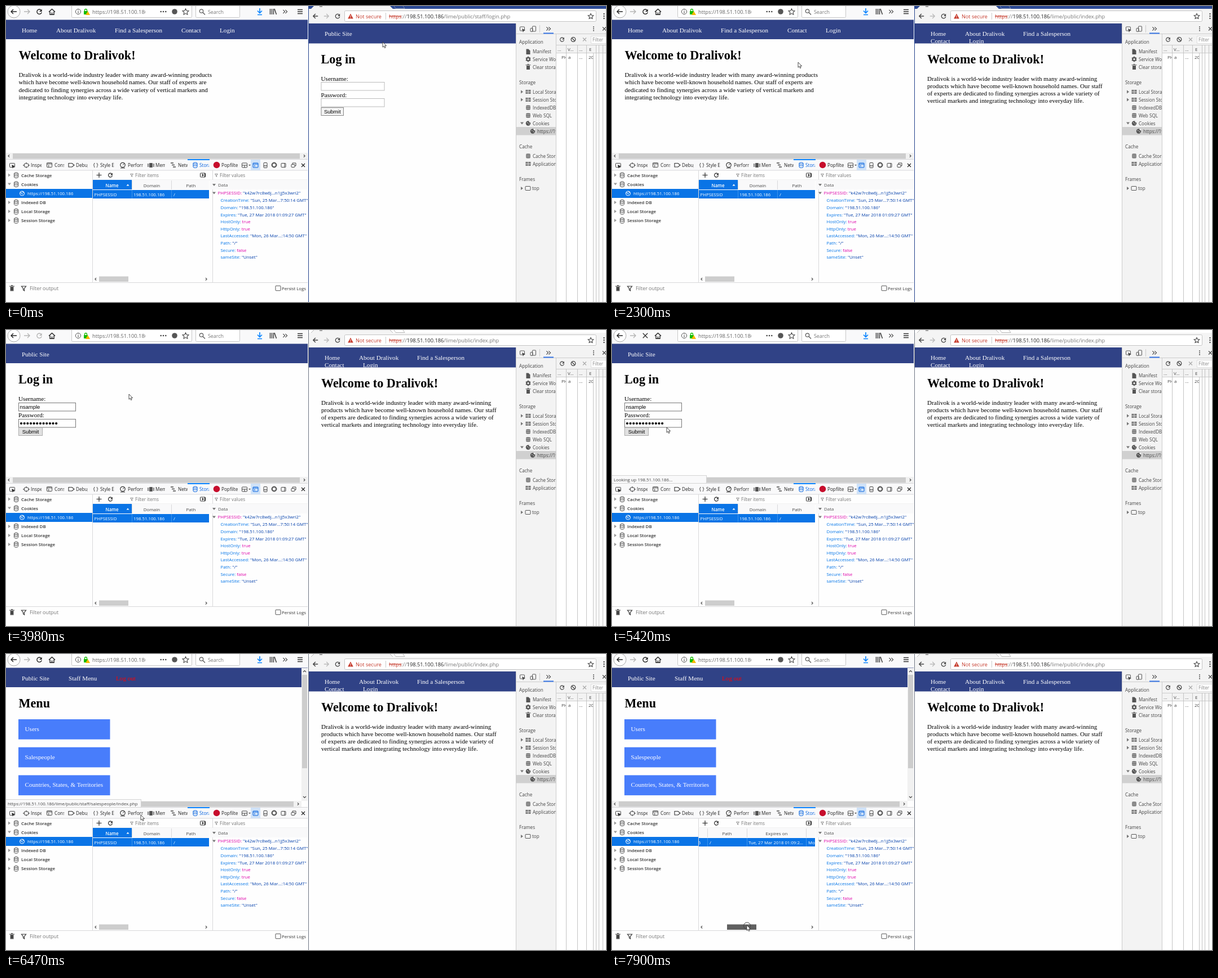
An HTML page that plays this animation: 1064x526 px, repeating every 8000 ms.

```html
<!DOCTYPE html>
<html lang="en">
<head>
<meta charset="utf-8">
<title>Two browsers, one session</title>
<style>
html, body { margin: 0; width: 100%; height: 100%; overflow: hidden; background: #fefefe; }
#stage { display: block; width: 100vw; height: 100vh; }
text { font: 7.85px "Open Sans", "Noto Sans", sans-serif; white-space: pre; }
.page text { font: 11.15px "Liberation Serif", serif; }
.page text.title { font-size: 22.2px; font-weight: bold; }
.page text.field { font: 9.5px "Liberation Sans", sans-serif; }
text.bold { font-weight: 600; }
</style>
</head>
<body>
<svg id="stage" viewBox="0 0 1064 526" xmlns="http://www.w3.org/2000/svg"></svg>
<script>
const HOST = '198.51.100.186', SITE = 'https://' + HOST, ROOT = '/lime/public/';
const BRAND = 'Dralivok';
const NAVY = '#304286', SELECT = '#0a74e6', INK = '#222', PALE = '#f9f9fa', RULE = '#d8d8da';

// Drawing helpers
const rect = (x, y, w, h, fill, stroke = 'none', extra = '') =>
  `<rect x="${x}" y="${y}" width="${w}" height="${h}" fill="${fill}" stroke="${stroke}" ${extra}/>`;
const line = (d, color = INK, width = 1, fill = 'none') =>
  `<path d="${d}" fill="${fill}" stroke="${color}" stroke-width="${width}"/>`;
const shape = (d, fill = INK) => `<path d="${d}" fill="${fill}"/>`;
const circle = (x, y, r, fill = 'none', stroke = 'none', width = 1) =>
  `<circle cx="${x}" cy="${y}" r="${r}" fill="${fill}" stroke="${stroke}" stroke-width="${width}"/>`;
const text = (x, y, s, fill = INK, size = 0, cls = '', anchor = 'start') =>
  `<text x="${x}" y="${y}" fill="${fill}" class="${cls}" text-anchor="${anchor}"${size ? ` style="font-size:${size}px"` : ''}>${s}</text>`;
const span = (s, fill, extra = '') => `<tspan fill="${fill}" ${extra}>${s}</tspan>`;
const clip = (x, y, w, h, body) =>
  `<svg x="${x}" y="${y}" width="${w}" height="${h}" viewBox="${x} ${y} ${w} ${h}" overflow="hidden">${body}</svg>`;
const group = (id, body, cls = '') => `<g id="${id}" class="${cls}">${body}</g>`;

// Icons
const arrow = (x, y, dir, color, r = 5) =>
  line(`M${x - dir * r} ${y}H${x + dir * r}M${x + dir * (r - 4)} ${y - 4}L${x + dir * r} ${y}L${x + dir * (r - 4)} ${y + 4}`, color, 1.4);
const reload = (x, y, r, color = INK) =>
  line(`M${x + r * .7} ${y - r * .7}A${r} ${r} 0 1 0 ${x + r} ${y + r * .25}`, color, r * .33) +
  shape(`M${x + r * 1.1} ${y - r * 1.1}V${y}H${x}Z`, color);
const cross = (x, y, r, color = INK, w = 1.2) =>
  line(`M${x - r} ${y - r}l${2 * r} ${2 * r}m0 ${-2 * r}l${-2 * r} ${2 * r}`, color, w);
const star = (x, y, r) => {
  const pts = Array.from({ length: 10 }, (_, i) => {
    const a = i * Math.PI / 5, d = i % 2 ? r * .48 : r;
    return (x + d * Math.sin(a)).toFixed(1) + ' ' + (y - d * Math.cos(a)).toFixed(1);
  });
  return line(`M${pts.join('L')}Z`, '#444', 1.1);
};
const dots = (x, y, dx, dy, r, color = '#444') => [-1, 0, 1].map(i => circle(x + i * dx, y + i * dy, r, color)).join('');
const chevron = (x, y, dir, r = 2.2, color = '#444') =>
  line(`M${x - dir * r / 2} ${y - r}L${x + dir * r / 2} ${y}L${x - dir * r / 2} ${y + r}`, color, 1.1);
const more = (x, y) => chevron(x - 2, y, 1, 3.2) + chevron(x + 2, y, 1, 3.2);
const twisty = (x, y, open, color = '#777') =>
  shape(open ? `M${x - 3} ${y - 2}h6l-3 4Z` : `M${x - 2} ${y - 3}v6l4-3Z`, color);
const stack = (x, y, color = '#444') => line(`M${x - 3.5} ${y - 3}v6.5a3.5 1.5 0 0 0 7 0v-6.5a3.5 1.5 0 0 0-7 0a3.5 1.5 0 0 0 7 0M${x - 3.5} ${y}a3.5 1.5 0 0 0 7 0`, color, 1);
const drum = (x, y) => rect(x - 4, y - 4, 8, 8, '#666', 'none', 'rx="2"') + line(`M${x - 4} ${y - 1.5}h8m-8 3h8`, '#f3f3f3', .8);
const grid = (x, y) => rect(x - 4.5, y - 3.5, 9, 7, '#666') + line(`M${x - 4.5} ${y - 1}h9m-9 2.3h9M${x} ${y - 3.5}v7`, '#f3f3f3', .8);
const funnel = (x, y, r, color) => line(`M${x - r} ${y - r}h${2 * r}l${-r * .75} ${r}v${r}l${-r * .5} ${-r * .4}v${-r * .6}Z`, color, r > 3 ? 1.2 : .8);
const cookie = (x, y) => circle(x, y, 4.2, '#555') + circle(x - 1.3, y - 1, .8, '#eee') + circle(x + 1.5, y + 1, .8, '#eee') + circle(x + 3, y - 3, 1.6, '#eee');
const frame = (x, y, w, h, color = '#444') => rect(x - w / 2, y - h / 2, w, h, 'none', color, 'rx=".8"');

// Web pages shown in both windows
const nav = (x, y, names) => names.map(([dx, s, color]) => text(x + dx, y, s, color || '#fff')).join('');
const title = (x, y, s) => text(x, y, s, '#000', 0, 'title');
const para = (x, y, lead, rows) => rows.map((s, i) => text(x, y + i * lead, s, '#000')).join('');
const input = (x, y, w, border) => rect(x + .5, y, w, 14.5, '#fff', border);
const filledFields = (x, y) => text(x + 2.5, y + 45, 'nsample', '#000', 0, 'field') +
  Array.from({ length: 12 }, (_, i) => circle(x + 5 + i * 5.65, y + 71, 2.1, '#000')).join('');
const loginForm = (x, y, w, fieldY, border, button) =>
  title(x, y, 'Log in') + text(x, y + 31, 'Username:', '#000') + text(x, y + 59.5, 'Password:', '#000') +
  input(x, fieldY, w, border) + input(x, fieldY + 29, w, border) +
  rect(x + .5, y + 78.5, button.w, 14, button.fill, button.border) +
  text(x + .5 + button.w / 2, y + 89, 'Submit', '#000', 0, 'field', 'middle');

const leftHome = nav(0, 47, [[28, 'Home'], [89, 'About ' + BRAND], [193, 'Find a Salesperson'], [311, 'Contact'], [379, 'Login']]) +
  title(22.5, 95, `Welcome to ${BRAND}!`) +
  para(22.5, 126, 13.4, [BRAND + ' is a world-wide industry leader with many award-winning products',
    'which have become well-known household names. Our staff of experts are',
    'dedicated to finding synergies across a wide variety of vertical markets and',
    'integrating technology into everyday life.']);
const leftLogin = nav(0, 47, [[28, 'Public Site']]) +
  loginForm(22, 95, 101, 129.5, '#777', { w: 42, fill: '#e1e1e1', border: '#adadad' }) + filledFields(22, 95);
const leftMenu = nav(0, 47, [[28, 'Public Site'], [111, 'Staff Menu'], [195, 'Log out', '#f00']]) + title(22.5, 95, 'Menu') +
  ['Users', 'Salespeople', 'Countries, States, &amp; Territories'].map((s, i) =>
    rect(22, 116 + i * 49.7, 162.5, 35.7, '#487dfb') + text(33.5, 137 + i * 49.7, s, '#fff')).join('') +
  rect(524, 25, 11, 236, '#f1f1f1') + rect(525, 37, 9, 166, '#cdcdcd') +
  line('M527 32l2.5-2.5l2.5 2.5M527 253l2.5 2.5l2.5-2.5', '#444', 1.1);
const rightLogin = nav(0, 53, [[565, 'Public Site']]) +
  loginForm(558.5, 102, 112, 135.5, '#bbb', { w: 39.5, fill: '#f4f4f4', border: '#888' });
const rightHome = clip(537, 31, 367, 35, nav(0, 53, [[565, 'Home'], [626, 'About ' + BRAND], [729, 'Find a Salesperson']]) +
    nav(0, 66, [[565, 'Contact'], [633, 'Login']])) +
  title(559, 102, `Welcome to ${BRAND}!`) +
  para(559, 132.7, 13, [BRAND + ' is a world-wide industry leader with many award-winning',
    'products which have become well-known household names. Our staff',
    'of experts are dedicated to finding synergies across a wide variety of',
    'vertical markets and integrating technology into everyday life.']);

// Left window
const leftBar = rect(0, 0, 535, 25, PALE) +
  circle(14, 10, 11, '#fff', '#aaa') + arrow(14, 10, -1, '#222') + arrow(37, 10, 1, '#b5b5b5') +
  group('reload', reload(59, 10, 4.2)) + group('reloadOff', reload(59, 10, 4.2, '#b5b5b5')) + group('stop', cross(59, 10, 4.2, '#333', 1.4)) +
  line('M76 10.5l5.5-5l5.5 5M78 10v5.2h7V10M81.5 15v-3.5', INK, 1.4) +
  rect(116.5, -2, 213, 22.5, '#fff', '#c8c8c8', 'rx="2"') +
  circle(128, 10, 4.6, 'none', '#555') + line('M128 9.2v3.6M128 7v1.1', '#555', 1.2) +
  rect(138, 9, 7, 6, '#12bc00') + line('M139.5 9V7.5a2 2 0 0 1 4 0V9', '#12bc00', 1.3) + shape('M145 9l4 7h-8Z', '#f5b800') +
  clip(153, 0, 94, 22, text(153, 13.5, SITE, '#666', 9.35)) +
  dots(279, 10, 4.3, 0, 1.3) + circle(299, 10, 4.8, '#555') + star(318.5, 10.5, 5.8) +
  rect(336.5, -2, 78, 22.5, '#fff', '#c8c8c8', 'rx="2"') + circle(346.5, 9, 3.2, 'none', '#555', 1.2) + line('M349 11.5l4 4', '#555', 1.3) +
  text(358, 13.5, 'Search', '#777', 8.9) +
  line('M450 4v8M446 8.5l4 4l4-4M446 15.5h8', '#0a84ff', 1.7) +
  line('M468.5 5v10M471.5 5v10M474.5 5v10M476 5l3.5 10', '#333', 1.4) + more(495, 10) +
  line('M517 6.5h9M517 10h9M517 13.5h9', '#333', 1.4);

const hBar = (id, end) => group(id, rect(0, 261, end + 14, 11, '#f1f1f1') + rect(12, 262, end - 12, 9.5, '#cdcdcd') +
  chevron(5, 266.5, -1) + chevron(end + 8, 266.5, 1));
const status = (id, w, s) => group(id, rect(-.5, 258.5, w, 14, PALE, '#d4d4d4') + text(3, 269, s, '#444', 7.85));

const tabs = [[44, 19, 'Inspector'], [86, 17, 'Console'], [124, 21, 'Debugger'], [167, 25, 'Style Editor'], [216, 27, 'Performance'],
  [265, 17, 'Memory'], [305, 17, 'Network'], [343, 17, 'Storage'], [382, 29, 'Popfilter']];
const toolTabs = rect(0, 272, 535, 20, PALE) + line('M0 272.5H535M0 292H535', RULE) + rect(322, 272, 39, 2, '#0a84ff') +
  tabs.map(([x, w, s]) => clip(x, 275, w, 16, text(x, 286, s, s === 'Storage' ? '#0060df' : INK, 8.2))).join('') +
  frame(11, 283, 9, 7) + shape('M10 282l6 3l-3 1l-1 3Z') +
  frame(36, 283, 7, 6) + line('M30 283h2M40 283h2M36 278v2M36 286v2') +
  frame(77, 282.5, 9, 8) + line('M72.5 280.5h9M74.5 282.5l2 1.5l-2 1.5', '#333') +
  line('M111 279.5h6l4 3.2l-4 3.3h-6Z', '#333', 1.1) + text(154.5, 286, '{ }', INK, 9) +
  circle(207, 282.5, 4.2, 'none', '#333', 1.2) + line('M207 283l2.5-3M203 288h8', '#333') +
  rect(254, 279, 6, 8, '#555', 'none', 'rx="1"') + line('M252 280v6M262 280v6', '#333', 1.2) +
  line('M292 279h5M294 282.5h5M296 286h5', '#444', 1.4) + stack(335.5, 282.5, '#0060df') +
  circle(373.5, 282.5, 5.8, '#c70d2c') +
  frame(423, 283, 9, 8) + line('M418.5 283h9M423 283v4', '#444') + shape('M430 282h4l-2 2Z', '#444') +
  rect(434, 273, 17, 19, '#cfe2f8') + frame(442.5, 283, 9, 8, '#0060df') + line('M438 281h9M440 283l1.5 1l-1.5 1.5', '#0060df') +
  frame(460, 283, 6, 9) + line('M457 284h6') + circle(475.5, 282.5, 3.5, 'none', '#444', 1.6) + circle(475.5, 282.5, 4.6, 'none', '#444', .8) +
  frame(492, 283, 8, 7) + line('M494 279.5v7', '#444') + frame(509, 284, 6, 5) + line('M508 281v-2h6v5h-2', '#444') + cross(527, 283, 3);

const tree = [['Cache Storage', 300.5], ['Cookies', 316.5, 1], ['Indexed DB', 349], ['Local Storage', 365], ['Session Storage', 381]]
  .map(([s, y, open]) => twisty(6, y, open, '#999') + stack(18, y) + text(27, y + 3, s, '#333', 7.95, 'bold')).join('') +
  rect(0, 325, 153, 16, SELECT) + circle(28.5, 333, 4, '#0a74e6', '#fff') + line('M25 332h3l1 3M29 329l1 2l2 1', '#fff') + text(38, 336, SITE, '#fff', 7.75);

const cells = rect(153, 309, 470, 17, PALE) + rect(153, 309, 70, 17, SELECT) + rect(153, 327, 470, 15, SELECT) +
  line('M223.5 310v16M293.5 310v16M363.5 310v16M468.5 310v16', RULE) + line('M223.5 327v15M293.5 327v15M363.5 327v15M468.5 327v15', '#3b92ec') +
  [[188, 'Name', '#fff', 'bold'], [258.5, 'Domain'], [328, 'Path'], [416, 'Expires on'], [520, 'Last accessed on']]
    .map(([x, s, c, k]) => text(x, 322, s, c || '#444', 8, k, 'middle')).join('') + shape('M213.5 319.5h5l-2.5-3Z', '#fff') +
  [[156.5, 'PHPSESSID'], [226, HOST], [297, '/'], [366, 'Tue, 27 Mar 2018 01:09:2…'], [472, 'Mon, 26 Mar 2018']]
    .map(([x, s]) => text(x, 337.8, s, '#fff', 7.8)).join('');

const table = line('M153.5 292V491M366.5 292V491', RULE) + line('M153 309H535', '#e4e4e6') +
  line('M165 296v9M160.5 300.5h9', INK, 1.2) + reload(185, 300.5, 3.5) + funnel(223, 301, 2.5, '#777') + text(229, 304, 'Filter items', '#777', 8.1) +
  frame(349, 300.5, 9, 7, '#333') + shape('M348 298v5l3-2.5Z') + line('M352.5 297v7') +
  clip(154, 309, 206, 34, group('cells', cells)) +
  chevron(159, 485.3, -1) + chevron(355, 485.3, 1) + '<rect id="thumb" y="480.5" width="52" height="9.5"/>';

const BLUE = '#0074e8', STRING = '#003eaa', PINK = '#dd00a9';
const details = funnel(373, 301, 2.5, '#777') + text(379, 304, 'Filter values', '#777', 8.1) +
  rect(361, 309, 174, 17, PALE) + twisty(369, 318, 1) + text(376, 321, 'Data', '#555', 8) + twisty(369, 332.5, 1) +
  clip(361, 326, 174, 130, text(375.5, 335.3, span('PHPSESSID: ', PINK) + span('"k42w7rc8w6j…n1jj5x3wri2"', STRING), INK, 7.85) +
    [['CreationTime', '"Sun, 25 Mar…7:50:14 GMT"'], ['Domain', `"${HOST}"`], ['Expires', '"Tue, 27 Mar 2018 01:09:27 GMT"'], ['HostOnly', 'true'],
      ['HttpOnly', 'true'], ['LastAccessed', '"Mon, 26 Mar…:14:50 GMT"'], ['Path', '"/"'], ['Secure', 'false'], ['sameSite', '"Unset"']]
      .map(([k, v], i) => text(380.5, 348.3 + i * 12.6, span(k + ': ', BLUE) + span(v, v[0] === '"' ? STRING : PINK), INK, 7.85)).join(''));

const consoleBar = line('M0 491.5H535', RULE) + rect(7.5, 499, 6, 7.5, '#555') + line('M6 498h9M9 496.5h3M9.5 500v5M11.5 500v5', '#333') +
  funnel(31.5, 502, 4, '#333') + text(42, 505, 'Filter output', '#777', 8.9) + frame(482.5, 501.5, 9, 8.5, '#555') + text(489, 504.8, 'Persist Logs', '#333', 7.75);

// Right window
const tabStrip = (id, back, edge, tab) => group(id, rect(536, 0, 528, 5, back) + shape('M541 5l5-5h135l5 5Z', '#f4f4f4') +
  line('M541 5l5-5M681 0l5 5M688 0l3 4.5h16l-3-4.5', tab, .8) + rect(536, 0, 1, 526, edge) + line('M556 1h5', '#555'));
const address = (id, path) => group(id, text(679, 21.5, span('https', '#c5392a', 'text-decoration="line-through"') +
  span('://', '#777') + span(HOST, '#222') + span(ROOT + path, '#777'), INK, 9.28));
const rightBar = rect(537, 5, 527, 26, '#f4f4f4') + arrow(549, 18, -1, '#444', 4.2) + arrow(568, 18, 1, '#bbb', 4.2) + reload(588, 18, 3.8, '#444') +
  rect(600.5, 8.5, 446, 19, '#fff', '#c4c4c4', 'rx="2"') + shape('M611 13.5l4.8 9h-9.6Z', '#c5392a') + line('M611 16.5v3M611 20.3v1.2', '#fff') +
  text(620, 21.5, 'Not secure', '#c5392a', 9.1) + line('M673.5 12v12', '#ccc') + star(1037, 18.5, 5) + dots(1060.5, 18, 0, 4, 1.2);

const heading = (y, s) => text(910, y + 3, s, '#444', 8.2);
const item = (x, y, s, icon = '') => icon + text(x, y + 3, s, '#444', 8.1);
const sidebar = clip(905, 49, 70, 477,
  heading(64, 'Application') + heading(135.5, 'Storage') + heading(249.5, 'Cache') + heading(307.5, 'Frames') + rect(905, 215, 70, 14.5, '#d0d0d0') +
  item(934, 81, 'Manifest', shape('M922.5 76.5h4l3 3v6.5h-7Z', '#555')) +
  item(934, 94.5, 'Service Workers', circle(926, 94.5, 3, 'none', '#555', 1.8) + line('M926 89.5v10M921.7 92l8.6 5M921.7 97l8.6-5', '#555', 1.2) + circle(926, 94.5, 1.5, '#f3f3f3')) +
  item(934, 108.5, 'Clear storage', rect(923, 106, 6, 7, '#555') + line('M921.5 104.8h9M924.5 103.5h3', '#555')) +
  [['Local Storage', 152.5], ['Session Storage', 166.5]].map(([s, y]) => twisty(915, y) + item(934, y, s, grid(926, y))).join('') +
  [['IndexedDB', 180.5], ['Web SQL', 194.5], ['Cache Storage', 266.5]].map(([s, y]) => item(934, y, s, drum(926, y))).join('') +
  item(934, 280.5, 'Application Cache', grid(926, 280.5)) + twisty(915, 208.5, 1) + item(934, 208.5, 'Cookies', cookie(926, 208.5)) +
  item(942, 222.5, SITE, cookie(934, 222.5)) + twisty(915, 324) + item(933, 324, 'top', frame(925.5, 324, 9, 7, '#555')));

const devTools = rect(904, 31, 160, 495, '#f3f3f3') + rect(975, 83, 89, 443, '#fff') + sidebar +
  line('M904.5 31V526M975.5 49V526M904 49.5H1064M975 69.5H1064M975 83.5H1064', '#ccc') +
  frame(915.5, 40.5, 8, 7, '#555') + shape('M915 40l6 3l-3 1l-1 3Z', '#444') + frame(936.5, 40.5, 6, 9, '#555') + frame(932, 42.5, 4, 6, '#555') +
  line('M946.5 34v13', '#ccc') + more(962, 40.5) + rect(953, 47.5, 18, 2, '#3b78e7') + dots(1042, 40.5, 0, 3.3, 1) + cross(1061, 40.5, 3, '#444') +
  reload(986, 59.5, 3.5, '#444') + circle(1006, 59.5, 3.8, 'none', '#444', 1.3) + line('M1003.5 57l5 5', '#444', 1.3) + cross(1026, 59.5, 3, '#aaa') +
  rect(1037.5, 53.5, 40, 13, '#fff', '#ddd') + text(1040, 62.7, 'Filter', '#888', 8.1) +
  line('M993.5 69V526M1013.5 69V526M1029.5 69V526M1041.5 83V526M1046.5 69V526M1051.5 69V526M1058.5 69V526', '#c4c4c4') +
  [[978, 79.5, '...'], [996, 79.5, 'V...'], [1016, 79.5, '...'], [1034, 79.5, 'E'], [985, 94, 'PH'], [997, 94, 'a'], [1016, 94, '...'], [1033, 94, '20']]
    .map(([x, y, s]) => clip(x, y - 10, y < 90 ? 13 : 8, 13, text(x, y, s, '#444', 8))).join('');

const pointer = group('cursor',
  group('ring', circle(.5, 1, 6, 'none', '#444', 1)) +
  group('arrow', line('M0 0V9.2L2.1 7.3L3.6 10.6L5.1 9.9L3.7 6.7H6.6Z', '#222', .8, '#fff')) +
  group('hand', line('M-1 .8Q0-.6 1 .8V4.5L4.6 5.4Q5.6 5.8 5.4 7.2L4.4 11.8H-.8L-3.6 7.6Q-3.4 6.3-2.2 6.8L-1 8Z', '#222', .8, '#fff')));

const stage = document.getElementById('stage');
stage.innerHTML = rect(0, 0, 1064, 526, '#fefefe') + leftBar + rect(0, 24.5, 535, 34.5, NAVY) +
  group('leftHome', leftHome, 'page') + group('leftLogin', leftLogin, 'page') + group('leftMenu', leftMenu, 'page') +
  hBar('wideBar', 521) + hBar('shortBar', 510) + toolTabs + tree + table + details + consoleBar +
  rightBar + tabStrip('focused', '#2c4a94', '#24438c', '#8a97b8') + tabStrip('blurred', '#fff', '#6f7683', '#aaa') +
  address('urlLogin', 'staff/login.php') + address('urlHome', 'index.php') + rect(537, 31, 367, 35.5, NAVY) +
  group('rightLogin', rightLogin, 'page') + group('rightHome', rightHome, 'page') + devTools +
  status('lookup', 168, `Looking up ${HOST}...`) + status('linkLogin', 190, SITE + ROOT + 'staff/login.php') +
  status('linkSales', 240, SITE + ROOT + 'staff/salespeople/index.php') + pointer;

// Timeline: bursts of evenly spaced steps [start, end, count]
const LOOP = 8000;
const bursts = [[130, 1090, 8], [1210, 2160, 8], [2300, 3210, 8], [3350, 4290, 8], [4430, 5420, 8], [5550, 6470, 8], [6630, 7080, 4], [7380, 7900, 5]];
const path = [[0, 668, 64], [541, 592, 46], [1090, 592, 46], [1480, 520, 150], [1890, 330, 184], [2160, 304, 120], [2690, 404, 45], [3300, 404, 45],
  [3887, 218, 114], [4290, 160, 134], [4713, 48, 181], [5137, 48, 181], [5420, 97, 173], [5812, 97, 173], [6470, 239, 286],
  [6780, 284, 400], [7080, 200, 482], [7380, 200, 482], [7900, 239, 482]];
const visible = {
  rightLogin: [[0, 810]], urlLogin: [[0, 810]], rightHome: [[810, LOOP]], urlHome: [[810, LOOP]],
  focused: [[0, 2815]], blurred: [[2815, LOOP]],
  leftHome: [[0, 3750]], leftLogin: [[3750, 5810]], leftMenu: [[5810, LOOP]], wideBar: [[0, 5810]], shortBar: [[5810, LOOP]],
  lookup: [[2945, 3750], [5000, 5810]], stop: [[2945, 3750], [5000, 5810]], reloadOff: [[3750, 4420]],
  reload: [[0, 2945], [4420, 5000], [5810, LOOP]],
  linkLogin: [[2555, 2945]], linkSales: [[5810, 6600]],
  hand: [[540, 1200], [2555, 3480], [5810, 6070]], arrow: [[0, 540], [1200, 2555], [3480, 5810], [6070, LOOP]], ring: [[7380, LOOP]]
};
const el = Object.fromEntries([...stage.querySelectorAll('[id]')].map(node => [node.id, node]));

function heldTime(t) {
  let held = 0;
  for (const [start, end, count] of bursts) {
    if (t < start) break;
    const gap = (end - start) / (count - 1);
    held = start + gap * Math.min(count - 1, Math.floor((t - start) / gap + 1e-6));
  }
  return held;
}
function cursorAt(t) {
  const i = path.findIndex(([time]) => time >= t - 1e-6);
  if (i < 1) return path[i < 0 ? path.length - 1 : 0].slice(1);
  const [t0, x0, y0] = path[i - 1], [t1, x1, y1] = path[i], k = (t - t0) / (t1 - t0);
  return [x0 + (x1 - x0) * k, y0 + (y1 - y0) * k];
}
function draw(t) {
  const held = heldTime(t), [x, y] = cursorAt(held), pressed = held >= 7380;
  for (const id in visible)
    el[id].style.display = visible[id].some(([a, b]) => held >= a && held < b) ? '' : 'none';
  el.cursor.setAttribute('transform', `translate(${Math.round(x)} ${Math.round(y)})`);
  const drag = pressed ? x - 200 : 0;
  el.thumb.setAttribute('x', 165 + drag);
  el.thumb.setAttribute('fill', pressed ? '#606060' : '#cdcdcd');
  el.cells.setAttribute('transform', `translate(${-drag * 124 / 39} 0)`);
}
const began = performance.now();
function tick() {
  draw((performance.now() - began) % LOOP);
  requestAnimationFrame(tick);
}
tick();
</script>
</body>
</html>
```
